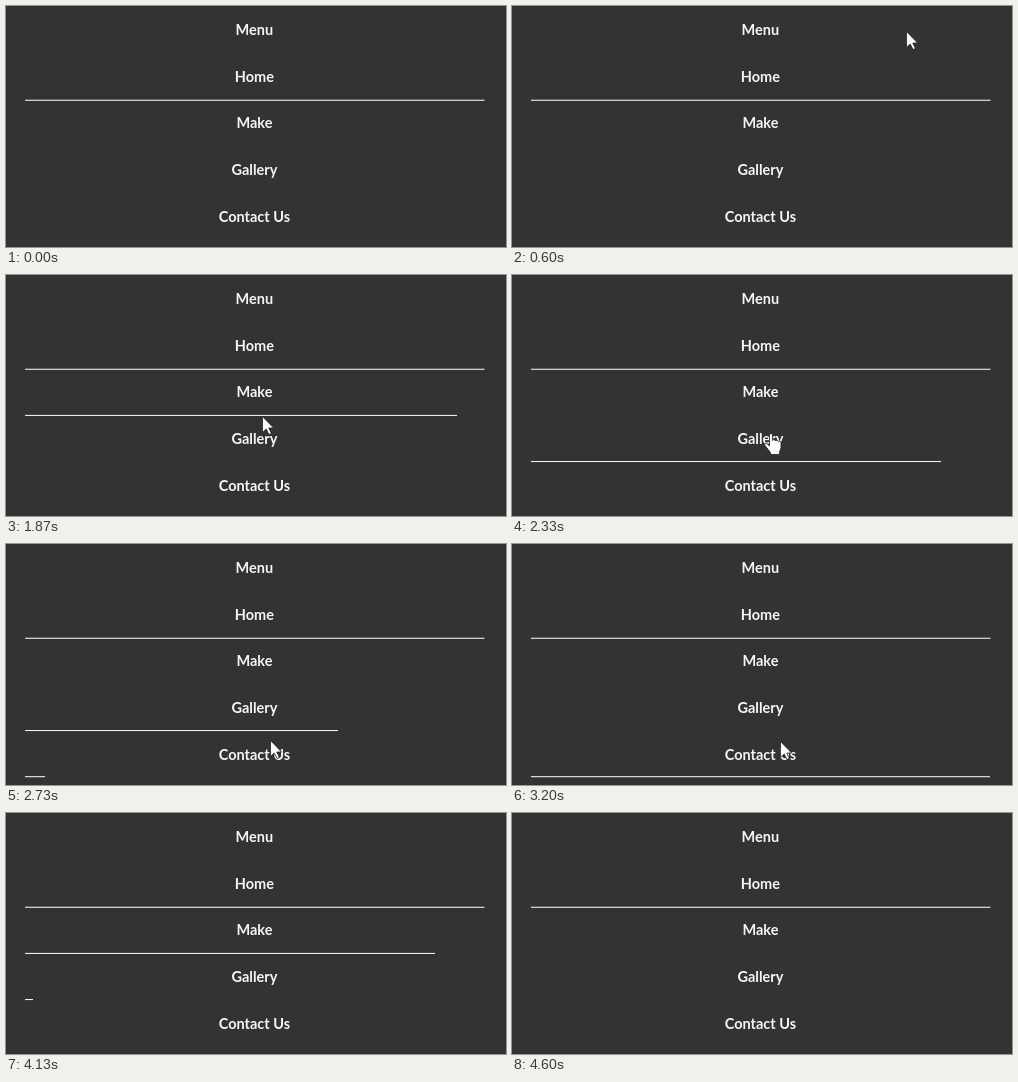
An HTML page that plays this animation: 500 by 241 pixels, repeating every 5470 ms.

```html
<!DOCTYPE html>
<html lang="en">
<head>
<meta charset="utf-8">
<title>Menu underline</title>
<style>
html, body { margin: 0; width: 100%; height: 100%; overflow: hidden; background: #333; }
svg { display: block; }
text { font: 700 14.5px Lato, "Open Sans", sans-serif; text-anchor: middle; fill: #f6f6f6; }
rect { fill: #fff; }
#cursor { fill: #fff; stroke: #222; stroke-width: .8; stroke-linejoin: round; }
</style>
</head>
<body>
<svg width="500" height="241" viewBox="0 0 500 241">
  <g id="menu"></g>
  <path id="cursor"/>
</svg>
<script>
const LOOP = 5470, FPS = 15, DURATION = 500;
const LINE = 459.5, HOVER_HEIGHT = 39;
const ARROW = 'M.5.5V16.5L4.2 13 7 18.5 9.4 17.4 6.8 12H11.6Z';
const HAND = 'M-.5 13V2a1.5 1.5 0 0 1 3 0V7.5c.5-1.5 3-1 3 .5 .5-1.2 2.8-1 3 .7 ' +
  '.6-.9 2.5-.7 2.5 1V14.5c0 2-1.5 3-1.5 5V21.5H.5V19.5L-5 12.5c-1-1.7 1-2.8 2-1.8Z';

// Pointer path: time in ms, x, y
const path = [
  [333, 489, 42], [600, 394, 25], [867, 320, 85], [1160, 285, 85],
  [1333, 266, 105], [1830, 256, 140], [2333, 258, 158], [2900, 266, 212],
  [3200, 268, 197], [3280, 270, 186], [3733, 277, 146], [4120, 280, 113]
];

const menu = document.getElementById('menu');
const cursor = document.getElementById('cursor');

function add(tag, attributes) {
  const el = document.createElementNS('http://www.w3.org/2000/svg', tag);
  for (const name in attributes) el.setAttribute(name, attributes[name]);
  return menu.appendChild(el);
}

const items = ['Menu', 'Home', 'Make', 'Gallery', 'Contact Us'].map((label, i) => {
  const text = add('text', { x: 248.4, y: 29 + 46.7 * i });
  text.textContent = label;
  const y = 47.6 + 46.15 * i;
  const line = add('rect', { x: 19, y, height: 1, width: i === 1 ? LINE : 0 });
  return { text, line, y, spans: [] };
});
const links = items.slice(2);

function pointer(t) {
  const next = path.findIndex(key => key[0] >= t);
  if (next < 1) return null;
  const [t0, x0, y0] = path[next - 1], [t1, x1, y1] = path[next];
  const k = (t - t0) / (t1 - t0);
  return { x: x0 + (x1 - x0) * k, y: y0 + (y1 - y0) * k };
}

// Collect the enter and leave times of each link along the path
for (const { y, spans } of links) {
  let wasOver = false;
  for (let t = 0; t < LOOP; t++) {
    const p = pointer(t);
    const over = p !== null && p.y > y - HOVER_HEIGHT && p.y < y;
    if (over && !wasOver) spans.push([t, LOOP]);
    if (!over && wasOver) spans[spans.length - 1][1] = t;
    wasOver = over;
  }
}

// The CSS "ease" curve, solved by bisection
function ease(x) {
  if (x <= 0) return 0;
  if (x >= 1) return 1;
  let lo = 0, hi = 1, s;
  const bezier = (a, b) => 3 * a * s * (1 - s) ** 2 + 3 * b * s * s * (1 - s) + s ** 3;
  for (let i = 0; i < 20; i++) {
    s = (lo + hi) / 2;
    if (bezier(.25, .25) < x) lo = s; else hi = s;
  }
  return bezier(.1, 1);
}

// An interrupted transition runs back in proportionally less time
function progress(t, [enter, leave]) {
  const grown = ease((Math.min(t, leave) - enter) / DURATION);
  return t < leave ? grown : grown * (1 - ease((t - leave) / (DURATION * grown)));
}

function contains(box, { x, y }) {
  return x > box.x && x < box.x + box.width && y > box.y && y < box.y + box.height;
}

function draw() {
  const t = Math.floor((performance.now() % LOOP + 5) * FPS / 1000) * 1000 / FPS;
  for (const { line, spans } of links) {
    const width = Math.max(...spans.map(span => progress(t, span))) * LINE;
    line.setAttribute('width', Math.round(width));
  }
  const p = pointer(t);
  cursor.style.display = p ? '' : 'none';
  if (p) {
    const onText = links.some(({ text }) => contains(text.getBBox(), p));
    cursor.setAttribute('d', onText ? HAND : ARROW);
    cursor.setAttribute('transform', `translate(${Math.round(p.x)} ${Math.round(p.y)})`);
  }
  requestAnimationFrame(draw);
}
draw();
</script>
</body>
</html>
```
